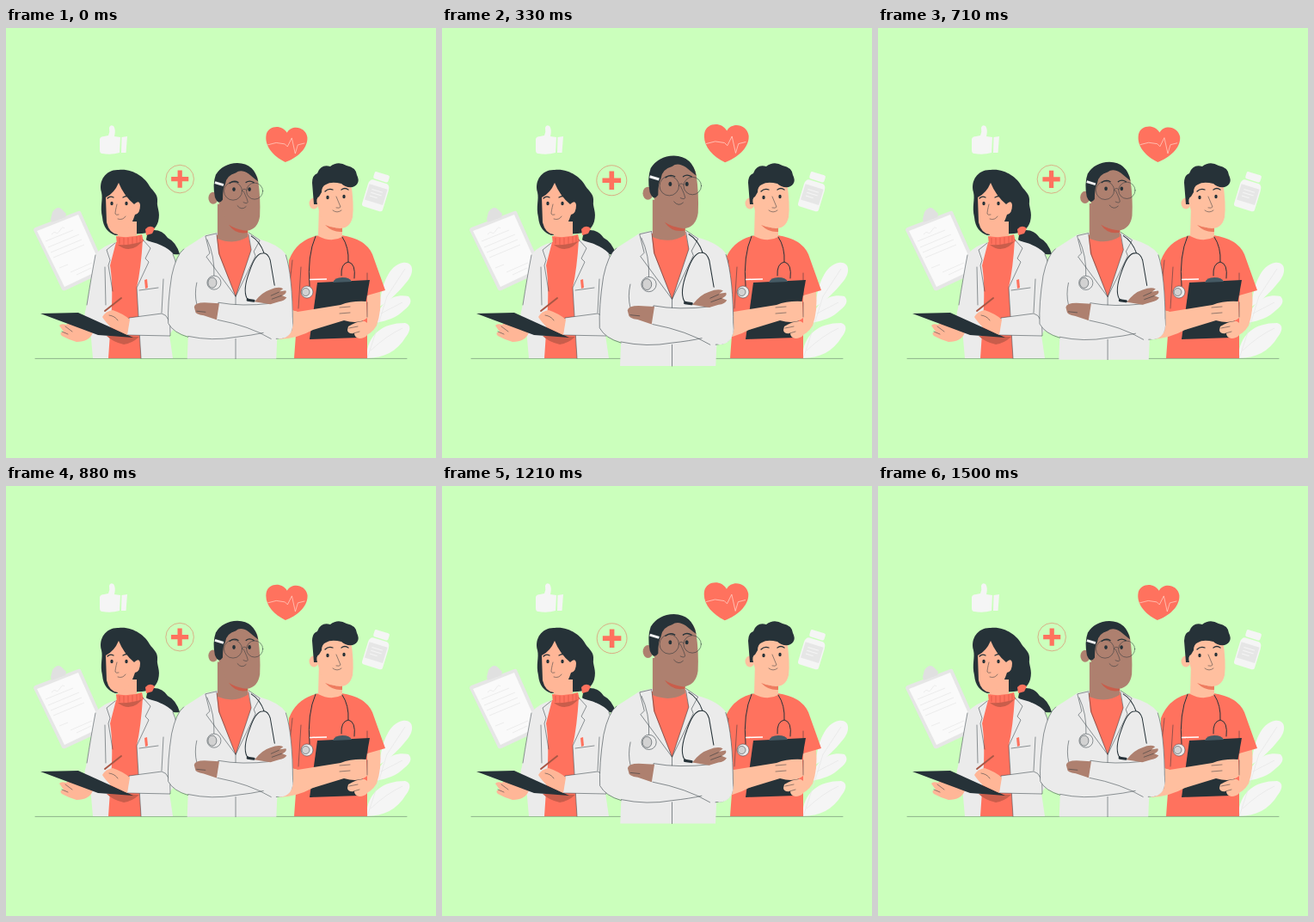
Recreate the animation shown at these times as an HTML page. Size 500 by 500 pixels, loop 1.54 s.

```html
<!DOCTYPE html>
<html lang="en">
<head>
<meta charset="utf-8">
<title>Medical team</title>
<style>
html, body { margin: 0; width: 100%; height: 100%; overflow: hidden; background: #cbffbc; }
svg { display: block; width: 100vw; height: 100vh; }
.dark { fill: #263238; }
.red { fill: #ff725e; }
.coat { fill: #ebebeb; }
.pale { fill: #f5f5f5; }
.light { fill: #ffb697; }
.fair { fill: #ffbf9f; }
.brown { fill: #ae806f; }
.shade { fill: #c95d4b; }
.line { fill: none; stroke: #263238; stroke-width: .5; stroke-linecap: round; stroke-linejoin: round; }
.bold { stroke-width: 1.3; }
.tube { stroke-width: 1; }
.faint { fill: none; stroke: #e2e2e2; stroke-width: .6; }
.edge { stroke: #263238; stroke-width: .5; stroke-linejoin: round; }
</style>
</head>
<body>
<svg viewBox="0 0 500 500">
  <!-- backdrop objects -->
  <g class="pale">
    <path d="M109 129Q110 126 114 126L119 125Q121 121 120 116Q121 112 125 114Q128 118 126 126L133 127L132 145Q122 148 112 146Q109 146 109 142Z"/>
    <path d="M134.500 127L141 126L139.500 145L134 145Z"/>
  </g>
  <g>
    <path d="M32 235Q32 233 34 232L84 213Q86 212 87 214L116 279Q117 282 114 284L69 305Q66 306 65 304Z" fill="#e6e6e6"/>
    <path d="M36 236L84 217L112 280L68 301Z" fill="#fafafa"/>
    <path d="M52 222L54 214Q60 206 65 211L70 216L69 220L53 226Z" fill="#e0e0e0"/>
    <path class="faint" d="M53 240q3-4 5-2t5-3t5-2M46 248l32-13M49 255l36-15M52 261l36-15M55 267l36-15M62 279l10-4M75 284l25-11M82 287l17-8"/>
  </g>
  <g transform="translate(430 193) rotate(17)">
    <rect class="pale" x="-8.500" y="-25" width="18" height="8.500" rx="2"/>
    <path class="pale" d="M-8-15H9Q13-14 13-8V15Q13 18 10 18H-9Q-12 18-12 15V-8Q-12-14-8-15Z"/>
    <rect x="-10.500" y="-9" width="22" height="19" fill="#e6e6e6"/>
    <path d="M-6-4H7M-6 0H7M-6 4H3" stroke="#f5f5f5"/>
  </g>
  <g class="pale">
    <path d="M434 324C437 296 446 276 461 273C474 271 475 284 467 294C459 304 454 309 443 319Z"/>
    <path d="M430 340C434 318 452 308 468 312C473 317 470 323 463 328C454 337 444 340 430 343Z"/>
    <path d="M419 384C420 356 438 343 464 343C472 345 470 353 465 359C455 376 439 384 419 384Z"/>
    <path class="faint" d="M420 384Q432 349 443 312L464 280M436 332L461 319M424 375Q442 358 461 349"/>
  </g>
  <path class="line" d="M34 384.400H466" opacity=".75"/>

  <!-- woman -->
  <g>
    <path class="dark" d="M165 236Q180 232 188 244Q198 249 202 263Q193 264 184 261Q174 259 163 246Z"/>
    <path class="dark" d="M131 165C117 164 107 177 111 191C113 200 109 207 112 220C113 232 119 238 127 241L158 239Q173 238 177 225C180 214 175 208 176 202C177 193 171 190 167 184C162 174 147 163 131 165Z"/>
    <path class="coat" d="M104 263Q114 252 129 249L158 246Q184 251 194 262Q201 275 201 300V340L190 357L194 384H101L98 350Q88 342 93 326Q99 290 104 263Z"/>
    <path class="red" d="M128 249L159 246Q157 280 152 302Q154 340 157 384H119L122 340Q125 300 121 276Z"/>
    <path class="light" d="M129 225H152V241Q143 247 130 243Z"/>
    <path class="light" d="M116 197Q126 192 131 180Q137 195 149 205Q155 199 156 206Q156 216 150 217Q143 239 130 240Q120 239 117 226Z"/>
    <path class="red" d="M128 242Q143 245 158 240L160 248Q145 254 129 252Z"/>
    <path class="shade" d="M130 252Q145 253 159 248L152 254Q141 261 130 252Z"/>
    <path d="M132 244v7M137 244v8M142 244v8M147 243v8M152 242v8M156 242v7" stroke="#d95745" stroke-width=".7"/>
    <path class="red" d="M162 234Q167 228 173 233L170 239L163 241Z"/>
    <path class="line" d="M129 205Q127 213 127 216Q128 218 131 217M130 222Q136 224 139 219"/>
    <path class="line bold" d="M118 198Q121 195 125 197M136 197Q141 194 145 197"/>
    <g class="dark"><ellipse cx="123" cy="204" rx="1.700" ry="2.300"/><ellipse cx="140" cy="204" rx="1.700" ry="2.300"/></g>
    <path class="line" d="M127 250L117 258L121 270L119 276L124 306M159 246L168 256L162 268L166 272L152 302L157 384M104 264Q99 290 94 322M115 278L116 322M155 305L177 302M183 292L181 331M194 263Q200 274 200 300"/>
    <path class="red" d="M161 293l3-1l1 10l-3 1z"/>
    <path class="coat edge" d="M143 337L181 332Q192 334 191 358L140 357Z"/>
    <path class="shade" d="M117 358L155 359Q146 367 137 368Q124 365 117 358Z"/>
    <path class="light" d="M62 346Q64 343 70 345L75 340Q79 340 83 347L101 354Q97 365 82 365Q72 362 65 358Q61 354 67 353Z"/>
    <path class="dark" d="M40 332L84 331L148 360L107 357Z"/>
    <path class="light" d="M112 336Q116 329 124 328Q136 332 144 339L141 357L122 348Q115 341 112 336Z"/>
    <path d="M115 329L134 314" stroke="#a95745" stroke-width="2" stroke-linecap="round"/>
    <path class="line" d="M69 347l8 6M65 353l7 3M120 334q7 1 10 6"/>
  </g>

  <!-- nurse -->
  <g>
    <path class="fair" d="M419 309L435 306Q437 329 431 346Q424 358 413 358L412 325Z"/>
    <path class="red" d="M329 270Q338 246 364 241H390Q418 245 426 263L441 305L420 311V384H335L339 330L328 327Z"/>
    <path class="fair" d="M364 205H391V243Q378 250 363 242Z"/>
    <path d="M371 229Q382 234 391 231V237Q380 238 371 229Z" fill="#ee7c60"/>
    <path class="fair" d="M361 202L364 178Q384 166 401 179Q405 205 403 220Q400 233 388 233Q371 231 367 222Z"/>
    <ellipse class="fair" cx="358" cy="204" rx="5.500" ry="6.500"/>
    <path class="dark" d="M358 205L356 180Q356 171 362 169Q366 158 377 161Q386 154 396 160Q407 162 408 171Q413 181 403 185Q395 186 390 181Q378 178 372 182Q367 184 367 191L364 196Q360 198 362 205Z"/>
    <path class="line" d="M384 196L389 208Q388 210 384 209M380 212Q385 216 390 212M333 270Q329 300 328 327M420 285V311M343 278L340 326"/>
    <path class="line bold" d="M371 190Q375 186 380 188M390 188Q394 185 398 188"/>
    <g class="dark"><ellipse cx="374" cy="197" rx="1.700" ry="2.300"/><ellipse cx="393" cy="196" rx="1.700" ry="2.300"/></g>
    <path class="line tube" d="M360 242Q350 265 353 300M391 243Q399 255 398 272M390 288Q389 274 398 272Q407 274 405 291"/>
    <circle class="coat edge" cx="350" cy="307" r="7"/><circle cx="348.500" cy="307" r="4.500" fill="#d2d2d2" class="edge"/>
    <path d="M353 292.500L373 292" stroke="#fff" stroke-width="1.500"/>
    <path class="dark" d="M362 296L423 293L411 360L353 362Z"/>
    <path d="M380 296Q382 290 391 290Q400 290 402 295Z" fill="#455a64"/>
    <path class="fair" d="M328 327L339 330L389 322Q402 317 419 318L420 337Q411 345 393 340L357 351Q339 361 318 362L314 345Z"/>
    <path class="fair" d="M398 347Q409 340 417 341L425 346Q422 361 411 361Q405 360 405 355Q397 356 397 351Z"/>
    <path class="line" d="M388 325l12-1M388 332l12-1M399 349l10-2M404 355l7-2M420 319v17"/>
  </g>

  <!-- doctor -->
  <g data-pulse="260.500 270.500">
    <path class="coat" d="M232 241L246 238H281L296 246Q317 252 325 263Q333 288 333.500 344Q332 361 315 361L314 384H211L212 358Q194 354 189 343Q189 313 193 288Q198 264 207 257Z"/>
    <path class="red" d="M245 241Q263 248 281 238L285 258L267 312L247 262Z"/>
    <path class="brown" d="M246 205H281V243Q265 253 246 245Z"/>
    <path class="shade" d="M259 229Q268 235 281 234V238Q267 241 259 229Z"/>
    <path class="brown" d="M247 202L248 178Q253 162 270 162Q291 163 293 178Q296 198 295 219Q293 234 280 236Q262 234 256 224Z"/>
    <ellipse class="brown" cx="241" cy="198" rx="5.500" ry="7"/>
    <path class="dark" d="M243 197Q240 182 244 171Q252 158 269 157.500Q289 158 293 179Q288 175 282 170Q273 164 267 169Q256 172 255 182Q252 186 252 200Q247 207 243 197Z"/>
    <path d="M243 180L253 183" stroke="#f5f5f5" stroke-width="2.800"/>
    <g class="line"><circle cx="264" cy="190" r="10.500"/><circle cx="289" cy="190" r="9.500"/><path d="M274.500 189Q277 186 279.500 189M276 190Q281 200 281 203Q280 205 276 203M269 207Q274 213 279 208"/></g>
    <path class="line bold" d="M260 181Q265 177 270 180M279 180Q283 177 288 180"/>
    <g class="dark"><ellipse cx="265" cy="188" rx="1.800" ry="2.400"/><ellipse cx="283" cy="188" rx="1.800" ry="2.400"/></g>
    <path class="line" d="M245 239L232 242L237 262L233 266L267 312L290 265L288 260L295 247L282 238M245 240L248 263L267 312M282 240L285 258L267 312V325M267 361V384M207 257Q198 264 193 288Q188 320 189 343Q195 354 212 359M222 296Q219 309 222 321M325 264Q333 288 333 344Q332 361 314 361"/>
    <path class="line" d="M234 246Q243 265 242 288"/>
    <path class="line tube" d="M285 242Q295 248 300 262M312 299L307 270Q304 261 298 262Q290 262 283 283Q275 304 280 314L285 317"/>
    <path class="line" d="M281 316l7 1" style="stroke-width:3"/>
    <circle class="coat edge" cx="242" cy="296" r="8"/><ellipse cx="240" cy="296" rx="5" ry="6" fill="#d2d2d2" class="edge"/>
    <path class="coat" d="M247 319Q274 324 291 319L323 321Q333 330 333 345Q332 360 318 361Q283 347 244 338Z"/>
    <path class="line" d="M244 338L247 319Q274 324 308 320"/>
    <path class="brown" d="M219 324Q220 319 231 319L248 320L245 339L230 334Q220 333 220 328Z"/>
    <path class="brown" d="M289 318Q297 307 307 304Q317 300 322 303L318 306L325 305Q327 308 321 311L326 313Q324 317 317 318L307 321Z"/>
    <path class="line" d="M317 307l-9 4M320 311l-11 4M246 339Q283 346 308 361M212 358Q240 364 267 359Q286 357 299 354M222 329l10 1"/>
  </g>

  <!-- floating icons -->
  <g data-pulse="267.500 153.500">
    <path class="red" d="M324.500 156C310 149 300 137 302.500 124C305 113 321 112 326.500 122C332 112 348 115 350 127C351 140 338 151 324.500 156Z"/>
    <path d="M304 136L314 133.500L324 135L327 138L332 128L336 146L339 136L347 134" fill="none" stroke="#ffd6cb" stroke-width=".7"/>
    <circle cx="202.500" cy="175.500" r="16.200" fill="none" stroke="#e27e66" stroke-width=".6"/>
    <path class="red" d="M199.900 165.500h5.200v7.400h7.400v5.200h-7.400v7.400h-5.200v-7.400h-7.400v-5.200h7.400z"/>
  </g>
</svg>
<script>
const LOOP = 1540, BEAT = 750, START = 20, PEAK = 360, GROWTH = 0.1;
const parts = [...document.querySelectorAll('[data-pulse]')];

// accelerating swell, then a steady release
function pulse(time) {
  const phase = (time - START + BEAT) % BEAT;
  const rise = PEAK - START;
  return phase < rise ? (phase / rise) ** 2.5 : 1 - (phase - rise) / (BEAT - rise);
}

function draw(now) {
  const scale = 1 + GROWTH * pulse(now % LOOP);
  for (const part of parts) {
    const [x, y] = part.dataset.pulse.split(' ');
    part.setAttribute('transform', `translate(${x} ${y}) scale(${scale}) translate(${-x} ${-y})`);
  }
  requestAnimationFrame(draw);
}
draw(performance.now());
</script>
</body>
</html>
```
